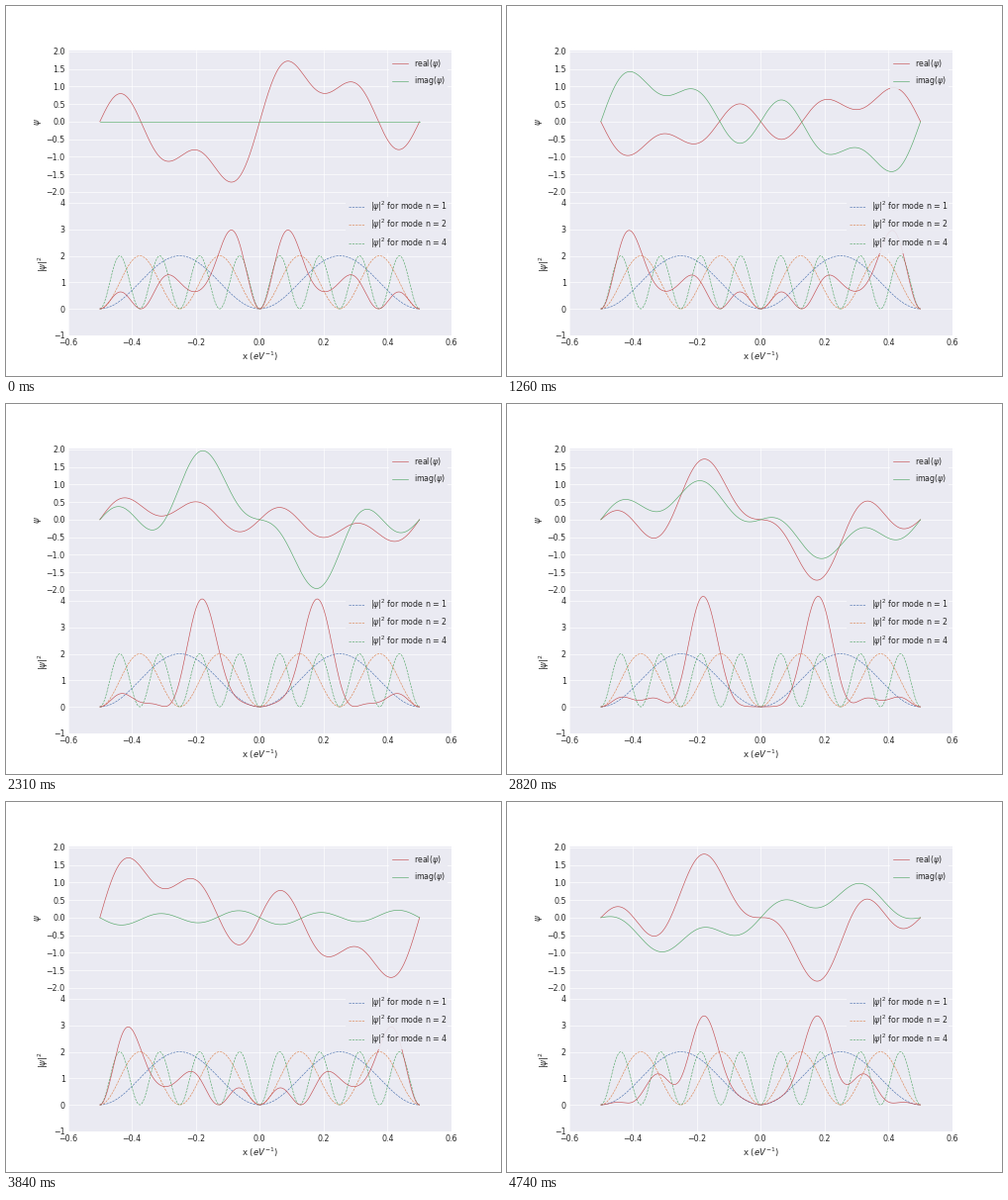
A matplotlib script that plays this animation: 500x374 px, repeating every 4770 ms.

```python
import matplotlib.pyplot as plt
import numpy as np
from matplotlib.animation import FuncAnimation
from matplotlib.patches import Rectangle

W, H, DPI = 500, 374, 100
FRAMES, INTERVAL = 159, 30
PT = 0.5625  # scale from nominal points to this resolution

RED, GREEN, BLUE, ORANGE = "#C44E52", "#55A868", "#4C72B0", "#DD8452"
PANEL, INK = "#EAEAF2", "#262626"
LINE = 0.8 * PT

MODES = np.array([1, 2, 4])
WEIGHTS = np.sqrt([0.5, 0.3, 0.2])
OMEGA = np.pi**2 / 400  # ground-mode phase advance per frame

plt.rcParams.update({
    "font.family": "DejaVu Sans",
    "font.size": 10 * PT,
    "axes.labelsize": 11 * PT,
    "axes.labelpad": 4 * PT,
    "text.color": INK,
    "axes.labelcolor": INK,
    "mathtext.fontset": "dejavusans",
})

x = np.linspace(-0.5, 0.5, 600)
basis = np.sqrt(2) * np.sin(2 * np.pi * np.outer(MODES, x))


def wave(frame):
    phase = np.exp(-1j * OMEGA * MODES**2 * frame)
    return (WEIGHTS * phase) @ basis


def panel(bottom, ylim, yticks, ylabel):
    ax = fig.add_axes([0.125, bottom, 0.775, 0.385], facecolor=PANEL)
    ax.set(xlim=(-0.6, 0.6), ylim=ylim, ylabel=ylabel, yticks=yticks,
           xticks=np.linspace(-0.6, 0.6, 7))
    ax.grid(color="white", lw=LINE)
    ax.set_axisbelow(True)
    ax.spines[:].set_visible(False)
    ax.tick_params(length=0, pad=3.5 * PT, labelcolor=INK)
    return ax


def legend(box, left, rows):
    """Opaque key; rows are (y, label, colour, line style) in pixels."""
    x0, y0, x1, y1 = box
    overlay.add_patch(Rectangle((x0, y0), x1 - x0, y1 - y0, fc=PANEL,
                                ec="none", alpha=0.9))
    for y, label, color, style in rows:
        overlay.plot([left, left + 15.6], [y, y], style, color=color, lw=LINE)
        overlay.text(left + 21.8, y + 2.7, label, va="baseline")


fig = plt.figure(figsize=(W / DPI, H / DPI), dpi=DPI, facecolor="white")
top = panel(0.495, (-2.03, 2.03), np.linspace(-2, 2, 9), r"$\psi$")
low = panel(0.11, (-1, 4.377), range(-1, 5), r"$|\psi|^2$")
top.tick_params(labelbottom=False)
top.yaxis.set_major_formatter("{x:.1f}")
low.set_xlabel(r"x ($eV^{-1}$)")

overlay = fig.add_axes([0, 0, 1, 1])
overlay.set(xlim=(0, W), ylim=(H, 0))
overlay.axis("off")

real_line, = top.plot([], [], color=RED, lw=LINE)
imag_line, = top.plot([], [], color=GREEN, lw=LINE)
for mode, color in zip(basis, (BLUE, ORANGE, GREEN)):
    low.plot(x, mode**2, "--", color=color, lw=LINE)
density_line, = low.plot([], [], color=RED, lw=LINE)

legend((387, 48.8, 446, 83.5), 390, [
    (58, r"real($\psi$)", RED, "-"),
    (75.5, r"imag($\psi$)", GREEN, "-"),
])
legend((343, 192.8, 446, 249.5), 346, [
    (y, rf"$|\psi|^2$ for mode n = {n}", color, "--")
    for y, n, color in zip((203, 221, 239.8), MODES, (BLUE, ORANGE, GREEN))
])


def update(frame):
    psi = wave(frame)
    real_line.set_data(x, psi.real)
    imag_line.set_data(x, psi.imag)
    density_line.set_data(x, np.abs(psi)**2)
    return real_line, imag_line, density_line


anim = FuncAnimation(fig, update, frames=FRAMES, interval=INTERVAL,
                     repeat=True, repeat_delay=0, blit=False)
plt.show()
```
